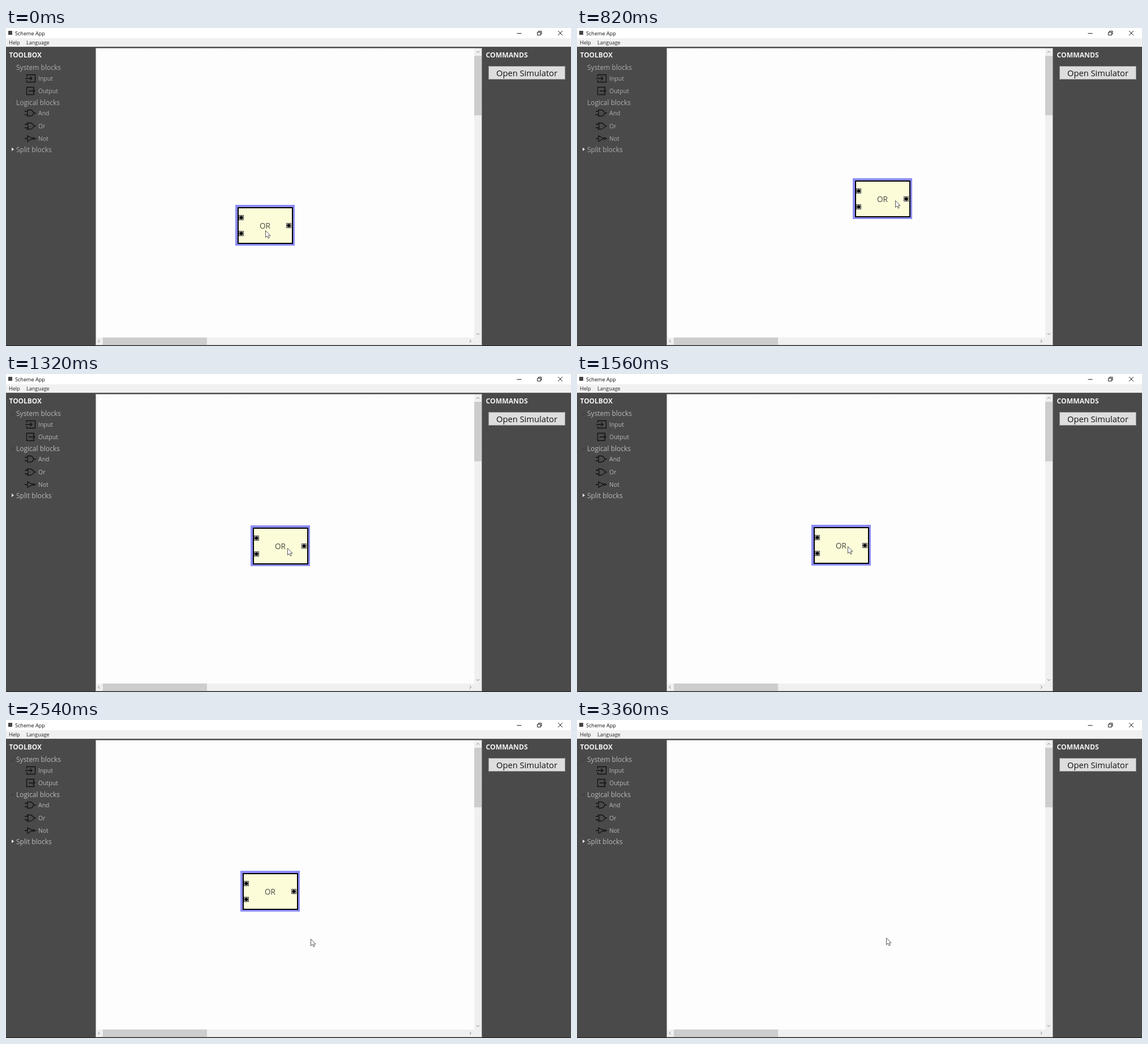
Animation of 998 by 561 pixels, one loop 3.38 s. Source, as an HTML page with a canvas:

```html
<!DOCTYPE html>
<html lang="en">
<head>
<meta charset="utf-8">
<title>Scheme App</title>
<style>
  html, body { margin: 0; width: 100%; height: 100%; overflow: hidden; background: #4a4a4a; }
  canvas { display: block; width: 998px; height: 561px; }
</style>
</head>
<body>
<canvas id="stage" width="998" height="561"></canvas>
<script>
const ctx = document.getElementById('stage').getContext('2d');
const LOOP = 3380;
const REFRESH_AT = 1100;
const DELETE_AT = 2900;
const FONT = '"Open Sans", "Noto Sans", sans-serif';

// Each key is [time in ms, x, y].
const blockPath = [
  [0, 405, 312], [420, 448, 284.5], [820, 487, 265], [960, 494, 282],
  [1080, 473, 312], [1200, 446, 298], [1320, 432, 267.5],
  [1480, 416, 265], [1600, 414, 266], [LOOP, 414, 266]
];
const cursorPath = [
  [0, 458, 357], [420, 508, 325], [820, 562, 304], [960, 568, 322],
  [1080, 544, 350], [1200, 514, 335], [1320, 497, 307],
  [1480, 481, 303], [1600, 479, 306], [1900, 505, 337],
  [2540, 538, 386], [2800, 546, 384], [LOOP, 546, 384]
];

function slope(keys, i, axis) {
  const a = keys[Math.max(i - 1, 0)], b = keys[Math.min(i + 1, keys.length - 1)];
  return (b[axis] - a[axis]) / (b[0] - a[0]);
}

// Cubic Hermite interpolation through the keys.
function along(keys, t) {
  let i = 0;
  while (i < keys.length - 2 && t >= keys[i + 1][0]) i++;
  const a = keys[i], b = keys[i + 1], span = b[0] - a[0];
  const u = (t - a[0]) / span, u2 = u * u, u3 = u2 * u;
  return [1, 2].map(axis => {
    if (a[axis] === b[axis]) return a[axis];
    return a[axis] * (2 * u3 - 3 * u2 + 1) + b[axis] * (3 * u2 - 2 * u3)
      + span * (slope(keys, i, axis) * (u3 - 2 * u2 + u) + slope(keys, i + 1, axis) * (u3 - u2));
  });
}

function rect(x, y, w, h, color) {
  ctx.fillStyle = color;
  ctx.fillRect(x, y, w, h);
}

function text(str, x, y, size, color, weight = 400, align = 'left') {
  ctx.font = `${weight} ${size}px ${FONT}`;
  ctx.textAlign = align;
  ctx.fillStyle = color;
  ctx.fillText(str, x, y);
}

function stroke(path, color, width = 1) {
  ctx.strokeStyle = color;
  ctx.lineWidth = width;
  ctx.stroke(new Path2D(path));
}

function drawTitleBar() {
  rect(0, 0, 998, 18, '#ffffff');
  rect(0, 18, 998, 15, '#f1f1f1');
  rect(4, 5, 7, 7, '#444444');
  text('Scheme App', 16, 12.5, 9.1, '#111');
  text('Help', 5, 29.2, 9.1, '#222');
  text('Language', 36, 29.2, 9, '#222');
  stroke('M902.5 9.5H910.5', '#222');
  stroke('M938.5 7.5H944.5V12.5H938.5ZM940.5 7V5.5H946V10.5H945', '#222');
  stroke('M975 5L983 13M983 5L975 13', '#222');
}

const icons = {
  input: 'M36.5 86V82.5H51.5V95.5H36.5V92M34 89H46M42.5 85.5L46 89L42.5 92.5',
  output: 'M49.5 108V104.5H36.5V117.5H49.5V114M40 111H51M47.5 107.5L51 111L47.5 114.5',
  and: 'M33 147H38M33 153H38M38 144.5H42C46 144.5 48 147 49 150C48 153 46 155.5 42 155.5H38ZM49 150H53',
  or: 'M33 170H39M33 176H39M37.5 167.5H42C46 167.5 48 170 50 173C48 176 46 178.5 42 178.5H37.5Q41 173 37.5 167.5ZM50 173H53',
  not: 'M33 195H38M38 190L47 195L38 200ZM47 195a1.7 1.7 0 1 0 3.4 0a1.7 1.7 0 1 0 -3.4 0M50 195H53'
};

function drawToolbox(refreshed) {
  const color = refreshed ? '#b9b9b9' : '#adadad';
  text('TOOLBOX', 5.5, 52, 11.9, '#f0f0f0', 700);
  text('System blocks', 18, 74.2, 12, color);
  text('Logical blocks', 18, 135.5, 12, color);
  text('Split blocks', 18, 218.8, 12, color);
  [['Input', 93], ['Output', 115.3], ['And', 154], ['Or', 176.7], ['Not', 199]]
    .forEach(([label, y]) => text(label, 57, y, 10.5, color));
  Object.values(icons).forEach(path => stroke(path, '#111', 1.3));
  ctx.fillStyle = '#f4f4f4';
  ctx.fill(new Path2D('M10 211L14 214L10 217Z'));
  if (refreshed) stroke('M9 72H13V68ZM9 133H13V129Z', '#3c3c3c');
}

function drawWorkspace() {
  rect(158, 35, 683, 525, '#fdfdfd');
  rect(827, 36, 13, 510, '#f0f0f0');
  rect(159, 546, 681, 13, '#f0f0f0');
  rect(827, 49, 13, 105, '#cdcdcd');
  rect(171, 546, 184, 13, '#cdcdcd');
  stroke('M831 43.5L833.5 41L836 43.5M831 538.5L833.5 541L836 538.5'
    + 'M165.5 550L163 552.5L165.5 555M819 550L821.5 552.5L819 555', '#777');
  ctx.setLineDash([1, 1]);
  stroke('M158 35.5H841M158 559.5H841M158.5 35V560M840.5 35V560', '#222');
  ctx.setLineDash([]);
}

function drawCommands() {
  text('COMMANDS', 847.5, 52, 12.2, '#f0f0f0', 700);
  rect(852, 67, 136, 24, '#dddddd');
  stroke('M852.5 67.5H987.5V90.5H852.5Z', '#8a8a8a');
  text('Open Simulator', 920, 85.2, 14.7, '#111', 400, 'center');
}

function drawPort(x, y) {
  rect(x - 4.5, y - 4.5, 9, 9, '#444');
  rect(x - 3.5, y - 3.5, 7, 7, '#d8d8d0');
  ctx.fillStyle = '#000';
  ctx.beginPath();
  ctx.arc(x, y, 3, 0, Math.PI * 2);
  ctx.fill();
}

function drawBlock(x, y) {
  ctx.save();
  ctx.translate(Math.round(x), Math.round(y));
  rect(0, 0, 105, 72, '#8c8cf6');
  rect(4, 4, 98, 65, '#000');
  rect(6, 6, 94, 61, '#fcfcd9');
  drawPort(10.5, 22.5);
  drawPort(10.5, 50.5);
  drawPort(94.5, 36.5);
  text('OR', 52.5, 42, 13.6, '#4a4a42', 400, 'center');
  ctx.restore();
}

function drawCursor(x, y) {
  ctx.save();
  ctx.translate(Math.round(x) + 0.5, Math.round(y) + 0.5);
  const arrow = 'M0 0V12L2.8 9.4L4.8 13.6L6.7 12.7L4.8 8.7H8.5Z';
  ctx.fillStyle = '#fff';
  ctx.fill(new Path2D(arrow));
  stroke(arrow, '#444', 0.9);
  ctx.restore();
}

function draw(t) {
  rect(0, 0, 998, 561, '#4a4a4a');
  drawTitleBar();
  rect(0, 33, 998, 1, '#5c5c5c');
  rect(0, 560, 998, 1, '#1c1c1c');
  drawToolbox(t >= REFRESH_AT);
  drawWorkspace();
  drawCommands();
  if (t < DELETE_AT) drawBlock(...along(blockPath, t));
  drawCursor(...along(cursorPath, t));
}

const start = performance.now();
function frame() {
  draw((performance.now() - start) % LOOP);
  requestAnimationFrame(frame);
}
frame();
</script>
</body>
</html>
```
